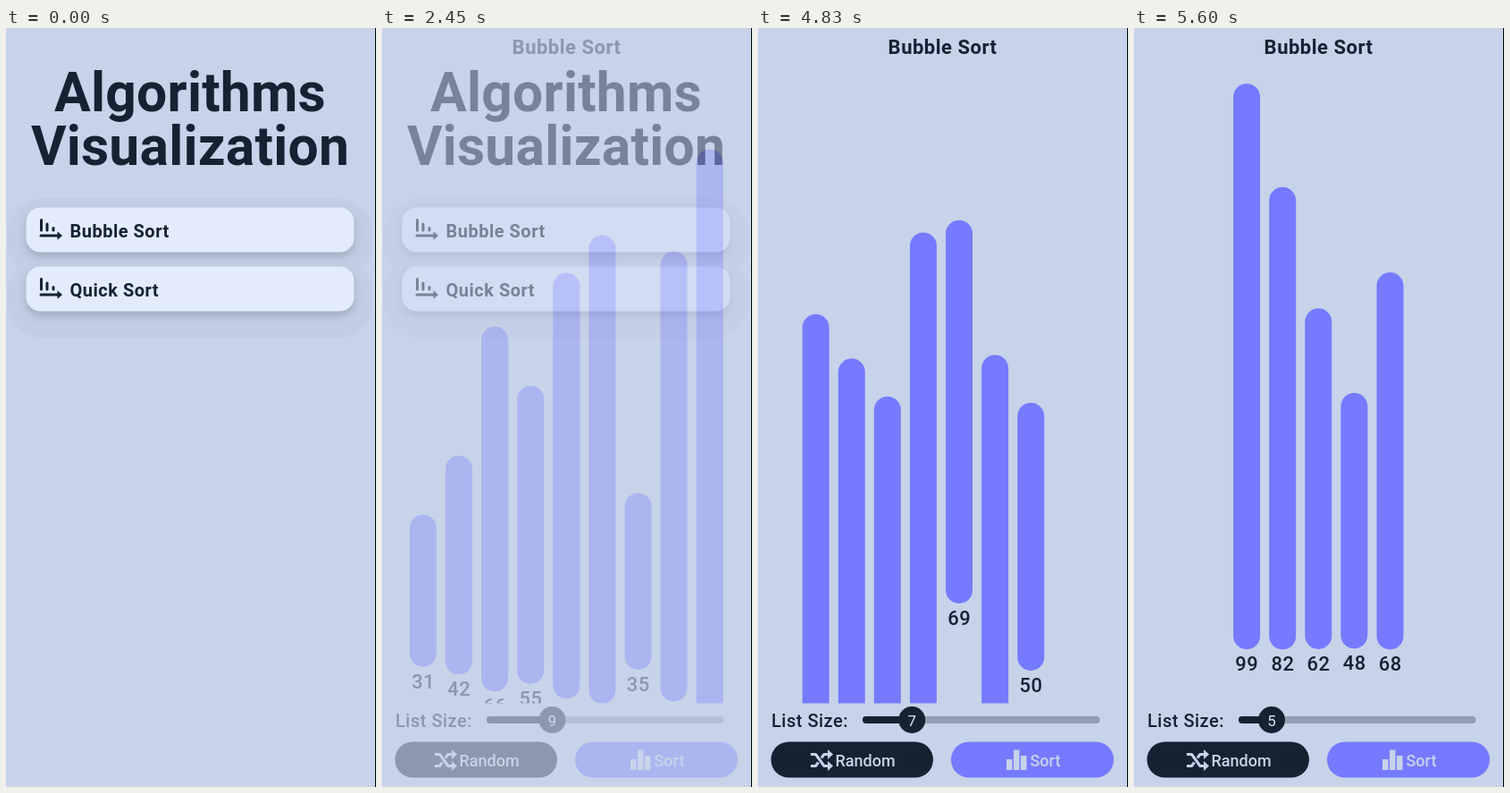
An HTML page that plays this animation: 414 by 848 pixels, repeating every 8 s.

```html
<!DOCTYPE html>
<html lang="en">
<head>
<meta charset="utf-8">
<title>Algorithms Visualization</title>
<style>
  html, body { margin: 0; width: 100%; height: 100%; overflow: hidden; background: #c7d3e9; }
  svg { display: block; width: 414px; height: 848px; }
  text { font: 500 22px Roboto, Arial, sans-serif; fill: #162231; letter-spacing: .5px; }
  .mid { text-anchor: middle; }
  .title { font-size: 60.5px; font-weight: 700; letter-spacing: .25px; }
  .card { fill: #e2ecfd; filter: drop-shadow(0 5px 5px rgba(22, 34, 49, .2)); }
  .halo { fill: #c3cee4; }
  .item, .size { font-size: 20px; }
  .item, .head { font-weight: 600; }
  .button { font-size: 18px; fill: #c7d3e9; letter-spacing: 0; }
  .count { font-size: 17px; font-weight: 400; fill: #dfe7f5; letter-spacing: 0; }
  .dark { fill: #162231; }
  .accent { fill: #757aff; }
  .light { fill: #c7d3e9; }
  .line { fill: none; stroke: #c7d3e9; stroke-width: 3; stroke-linejoin: round; }
</style>
</head>
<body>
<svg viewBox="0 0 414 848">
  <defs>
    <clipPath id="chart"><rect y="40" width="414" height="714.5"/></clipPath>
    <g id="sortIcon">
      <path d="M39.5 214.5V226M46 219V226M53 223.500V226M39 232H58" fill="none" stroke="#162231" stroke-width="3" stroke-linecap="round"/>
      <path class="dark" d="M57.500 227.200L63 232L57.500 236.800Z"/>
    </g>
  </defs>
  <rect class="light" width="414" height="848"/>

  <g id="home">
    <text class="title mid" x="206" y="93">Algorithms</text>
    <text class="title mid" x="206" y="153">Visualization</text>
    <rect class="halo" x="1" y="190" width="410" height="91" rx="42"/>
    <rect class="halo" x="1" y="256" width="410" height="91" rx="42"/>
    <rect class="card" x="22.500" y="200.500" width="367" height="50" rx="16"/>
    <rect class="card" x="22.500" y="266.500" width="367" height="50" rx="16"/>
    <use href="#sortIcon"/>
    <use href="#sortIcon" y="66"/>
    <text class="item" x="71.500" y="234">Bubble Sort</text>
    <text class="item" x="71.500" y="300">Quick Sort</text>
  </g>

  <g id="sorter">
    <rect class="light" width="414" height="848"/>
    <text class="head mid" x="206.500" y="29">Bubble Sort</text>
    <g id="bars" clip-path="url(#chart)"></g>
    <text class="size" x="15" y="781">List Size:</text>
    <rect x="117" y="769" width="265.500" height="8" rx="4" fill="#939eb2"/>
    <rect id="track" class="dark" x="117" y="769" height="8" rx="4"/>
    <circle id="thumb" class="dark" cy="773" r="15"/>
    <text id="count" class="count mid" y="780"></text>

    <rect class="dark" x="14.500" y="797.500" width="181.500" height="40" rx="20"/>
    <path class="line" d="M59 811.500H64.500L74 824.500H79M59 824.500H64.500L67.500 820.500M71 815.500L74 811.500H79"/>
    <path class="light" d="M78 806L84 811.500L78 817ZM78 819L84 824.500L78 830Z"/>
    <text class="button" x="86.500" y="825">Random</text>

    <rect class="accent" x="216" y="797.500" width="182" height="40" rx="20"/>
    <path class="light" d="M278 817h6.500v12h-6.500zM286 806.500h6.500v22.500h-6.500zM294 813h6.500v16h-6.500z"/>
    <text class="button" x="304.500" y="825">Sort</text>
  </g>
  <rect x="413" width="1" height="848"/>
</svg>
<script>
const LOOP = 8000, STEP = 70;
const FADE_START = 2250, FADE_TIME = 700, SLIDE_START = 2265;
const OMEGA = 20; // critically damped spring, rad/s
const PITCH = 40.1, BAR = 30, FLOOR = 694;

// Each list replaces the previous one at its time.
const lists = [
  { at: 0, values: [31, 42, 66, 55, 76, 83, 35, 80, 99] },
  { at: 4676.5, values: [64, 52, 33, 78, 78, 42, 49, 39] },
  { at: 4800, values: [91, 82, 101, 85, 69, 80, 50] },
  { at: 4900, values: [84, 61, 69, 97, 35, 66] },
  { at: 5180, values: [99, 82, 62, 48, 68] }
];

const $ = id => document.getElementById(id);
const set = (node, attrs) => {
  for (const key in attrs) node.setAttribute(key, attrs[key]);
};
const add = (parent, tag, attrs) => {
  const node = document.createElementNS("http://www.w3.org/2000/svg", tag);
  set(node, attrs);
  return parent.appendChild(node);
};

const bars = lists[0].values.map(() => {
  const group = add($("bars"), "g", {});
  return {
    group,
    rect: add(group, "rect", { class: "accent", width: BAR, rx: BAR / 2 }),
    label: add(group, "text", { class: "mid", x: BAR / 2 + .25 })
  };
});

const barHeight = value => 6.794 * value - 40.6;
const goalX = (values, i) => 206.4 - (PITCH * values.length - 10) / 2 + PITCH * i;
const goalY = (values, i) => FLOOR - barHeight(values[i]);

// Follows one coordinate of bar i through every list change up to t.
function follow(goal, i, t) {
  let pos = goal(lists[0].values, i), vel = 0;
  for (let k = 1; k < lists.length && t >= lists[k].at; k++) {
    const { at, values } = lists[k];
    if (i >= values.length) break;
    const end = k + 1 < lists.length ? Math.min(t, lists[k + 1].at) : t;
    const dt = (end - at) / 1000, decay = Math.exp(-OMEGA * dt);
    const target = goal(values, i), gap = pos - target, c = vel + OMEGA * gap;
    pos = target + (gap + c * dt) * decay;
    vel = (vel - OMEGA * c * dt) * decay;
  }
  return pos;
}

// cubic-bezier(.4, 0, .2, 1)
function ease(x) {
  if (x <= 0) return 0;
  if (x >= 1) return 1;
  let lo = 0, hi = 1;
  for (let n = 0; n < 24; n++) {
    const s = (lo + hi) / 2, r = 1 - s;
    if (1.2 * r * r * s + .6 * r * s * s + s ** 3 < x) lo = s; else hi = s;
  }
  return 3 * (1 - lo) * lo * lo + lo ** 3;
}

function draw(t) {
  const fade = ease((t - FADE_START) / FADE_TIME);
  set($("home"), { opacity: 1 - fade });
  set($("sorter"), { opacity: fade });

  const { values } = lists.filter(list => t >= list.at).pop();
  const u = OMEGA * Math.max(0, t - SLIDE_START) / 1000;
  const slide = (1 + u) * Math.exp(-u);
  bars.forEach(({ group, rect, label }, i) => {
    const shown = i < values.length;
    set(group, { display: shown ? "inline" : "none" });
    if (!shown) return;
    const height = barHeight(values[i]);
    const x = follow(goalX, i, t), y = follow(goalY, i, t) + slide * height;
    set(group, { transform: `translate(${x} ${y})` });
    set(rect, { height });
    set(label, { y: height + 24 });
    label.textContent = values[i];
  });

  const thumbX = 108.4 + 9.12 * values.length;
  set($("track"), { width: thumbX - 117 });
  set($("thumb"), { cx: thumbX });
  set($("count"), { x: thumbX });
  $("count").textContent = values.length;
}

const start = performance.now();
function tick() {
  const t = (performance.now() - start) % LOOP;
  draw(Math.floor(t / STEP) * STEP);
  requestAnimationFrame(tick);
}
tick();
</script>
</body>
</html>
```
